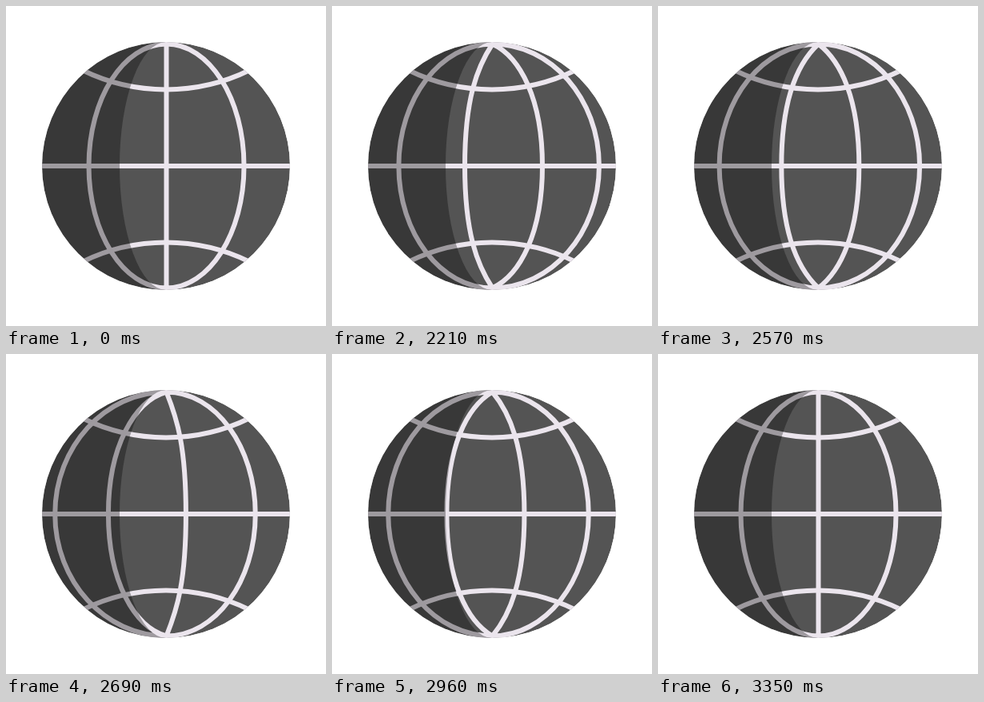
These frames come from a looping animation (400x400 px, 3.44 s). An HTML page:

```html
<!DOCTYPE html>
<html lang="en">
<head>
<meta charset="utf-8">
<title>Spinning globe</title>
<style>
  html, body { margin: 0; width: 100%; height: 100%; overflow: hidden; background: #fff; }
  svg { display: block; width: 100vw; height: 100vh; }
  .lines { fill: none; stroke: #ebe5ed; stroke-width: 6; stroke-linecap: round; }
</style>
</head>
<body>
<svg viewBox="0 0 400 400">
  <clipPath id="disc"><circle cx="200" cy="200" r="155"/></clipPath>
  <g clip-path="url(#disc)">
    <circle cx="200" cy="200" r="155" fill="#545454"/>
    <g class="lines">
      <path d="M40 200H360M95 80A238 238 0 0 0 305 80M95 320A238 238 0 0 1 305 320"/>
      <path id="meridians"/>
    </g>
    <path d="M200 45A58 155 0 0 0 200 355H40V45Z" fill="#000" fill-opacity=".33"/>
  </g>
</svg>
<script>
  const LOOP = 3440, DELAY = 2000, SPIN = 1350, STEP = 30, TURNS = 7;
  const CX = 200.5, CY = 200, RY = 152.5, KAPPA = 0.5523;
  const STOPS = [-153.5, -97, 0, 97, 153.5];
  const meridians = document.getElementById('meridians');

  const bezier = (s, a, b) => 3 * s * (1 - s) ** 2 * a + 3 * s * s * (1 - s) * b + s ** 3;

  // cubic-bezier(.167, .167, .46, 1)
  function ease(t) {
    if (t <= 0 || t >= 1) return t <= 0 ? 0 : 1;
    let lo = 0, hi = 1;
    for (let i = 0; i < 30; i++) {
      const mid = (lo + hi) / 2;
      if (bezier(mid, 0.167, 0.46) < t) lo = mid; else hi = mid;
    }
    return bezier(lo, 0.167, 1);
  }

  // Half ellipse that straightens towards the middle of the globe
  function meridian(x) {
    const tip = RY - 45 * (1 - Math.min(1, Math.abs(x) / 97));
    const side = RY * KAPPA;
    const at = (dx, dy) => (CX + dx).toFixed(2) + ' ' + (CY + dy).toFixed(2) + ' ';
    return 'M' + at(0, -RY) +
      'C' + at(x * KAPPA, -tip) + at(x, -side) + at(x, 0) +
      'C' + at(x, side) + at(x * KAPPA, tip) + at(0, RY);
  }

  function draw(now) {
    const time = Math.floor((now % LOOP - DELAY) / STEP) * STEP;
    const turn = TURNS * ease(time / SPIN);
    const p = turn % 1;
    // The line entering on the left is absent at rest and at the very start
    const first = turn < 0.2 || turn >= TURNS ? 1 : 0;
    let d = '';
    for (let i = first; i < 4; i++) d += meridian(STOPS[i] + (STOPS[i + 1] - STOPS[i]) * p);
    meridians.setAttribute('d', d);
  }

  const start = performance.now();
  function tick() {
    draw(performance.now() - start);
    requestAnimationFrame(tick);
  }
  tick();
</script>
</body>
</html>
```
